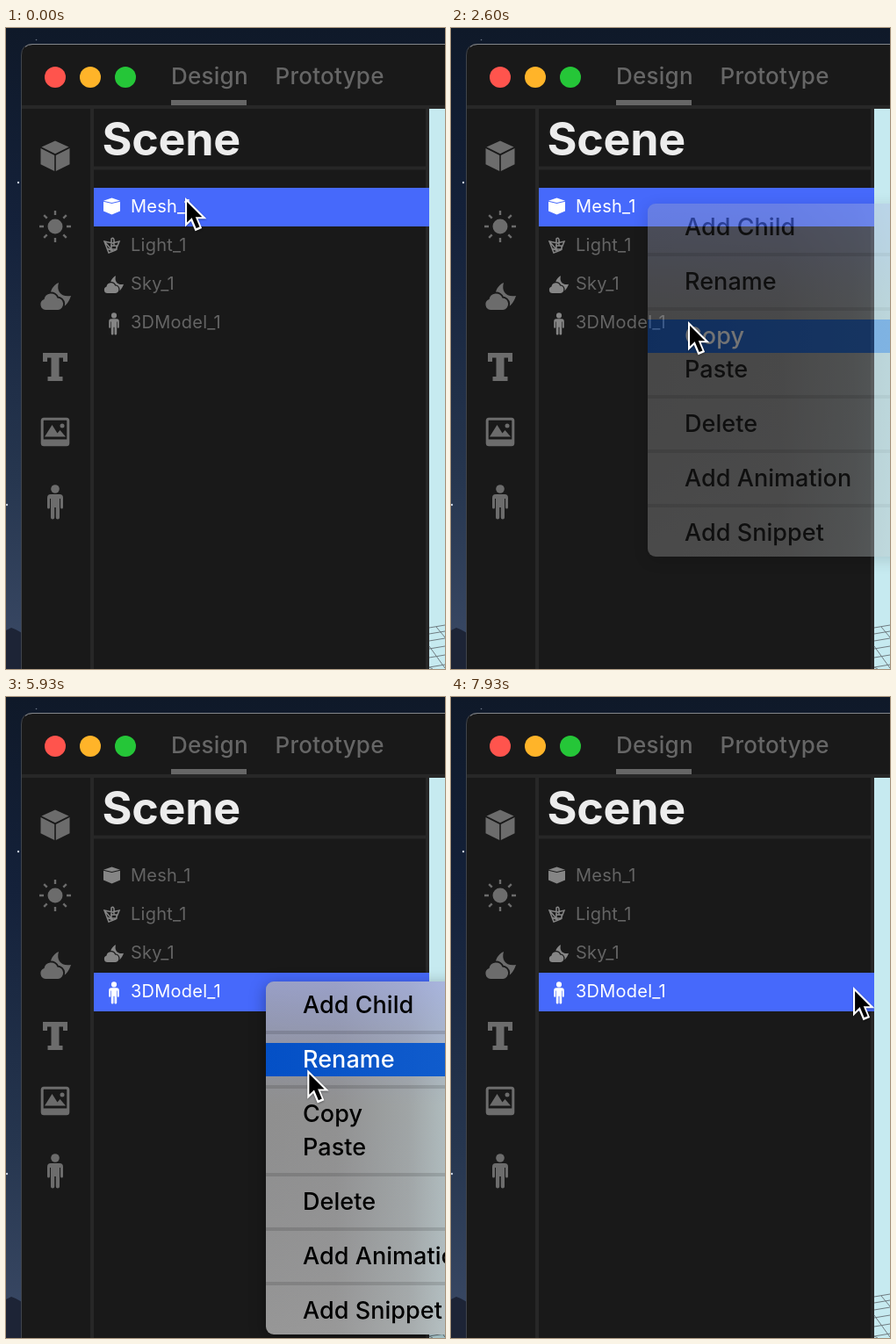
Animation of 500x730 px, one loop 8 s. Source, as an HTML page:

```html
<!DOCTYPE html>
<html lang="en">
<head>
<meta charset="utf-8">
<title>Scene panel</title>
<style>
  html, body { margin: 0; width: 100%; height: 100%; overflow: hidden; background: #191919; }
  svg { display: block; width: 100vw; height: 100vh; }
  text { font-family: Inter, "Open Sans", sans-serif; }
  .tab { font-size: 26px; font-weight: 500; fill: #666; letter-spacing: .25px; }
  .title { font-size: 52px; font-weight: 700; fill: #ececec; letter-spacing: -.3px; }
  .row text { font-size: 20px; letter-spacing: .25px; fill: currentColor; }
  .item { font-size: 27px; font-weight: 450; letter-spacing: .05px; }
  .shadow { filter: drop-shadow(0 4px 9px rgba(0, 0, 0, .35)); }
  .cursor { filter: drop-shadow(0 1px 1px rgba(0, 0, 0, .35)); }
</style>
</head>
<body>
<svg viewBox="0 0 500 730" preserveAspectRatio="none">
  <defs>
    <linearGradient id="night" x2="0" y2="1">
      <stop offset="0" stop-color="#0f1929"/>
      <stop offset=".3" stop-color="#14213a"/>
      <stop offset=".7" stop-color="#26364f"/>
      <stop offset="1" stop-color="#3b4a66"/>
    </linearGradient>
    <linearGradient id="glass" gradientUnits="userSpaceOnUse" x1="224" y1="0" x2="500" y2="0">
      <stop offset="0" stop-color="#8d8d8d"/>
      <stop offset=".55" stop-color="#919191"/>
      <stop offset=".85" stop-color="#a0a5a6"/>
      <stop offset="1" stop-color="#afbbbd"/>
    </linearGradient>
    <linearGradient id="tint" x2="0" y2="1">
      <stop offset="0" stop-color="#a3b0ff" stop-opacity=".5"/>
      <stop offset=".12" stop-color="#9aa8f0" stop-opacity=".36"/>
      <stop offset=".35" stop-color="#9098c0" stop-opacity="0"/>
      <stop offset="1" stop-color="#fff" stop-opacity=".07"/>
    </linearGradient>
    <linearGradient id="pick" gradientUnits="userSpaceOnUse" x1="0" y1="0" x2="276" y2="0">
      <stop offset="0" stop-color="#0450c6"/>
      <stop offset="1" stop-color="#1460cf"/>
    </linearGradient>

    <!-- icons are centred on 0,0 -->
    <g id="cube" fill="currentColor">
      <path d="M0-17.5 15.5-10.500 0-2.700-15.500-10.500Z"/>
      <path d="M-16.500-9-.8-1V17L-16.500 9.300Z"/>
      <path d="M16.500-9 .8-1V17L16.500 9.300Z"/>
    </g>
    <g id="sun" fill="currentColor" stroke="currentColor">
      <circle r="8.5" stroke="none"/>
      <path d="M0-13V-18M0 13V18M-13 0H-18M13 0H18M-9.3-9.3-12.8-12.8M9.3-9.3 12.8-12.8M-9.3 9.3-12.8 12.8M9.3 9.3 12.8 12.8" stroke-width="2.4"/>
    </g>
    <g id="sky" fill="currentColor">
      <path d="M4-16C1-6 7 1 18-1 15 8 10 13 3 13-8 13-10-10 4-16Z"/>
      <path d="M-11 15A6.200 6.200 0 0 1-12.500 3 7.800 7.800 0 0 1 2.500 1.500 6.800 6.800 0 0 1 3.500 15Z" stroke="#191919" stroke-width="4" paint-order="stroke"/>
    </g>
    <path id="type" fill="currentColor" d="M-14-16H14V-6H9V-10.500H4.500V11H8.500V16H-8.500V11H-4.500V-10.500H-9V-6H-14Z"/>
    <g id="photo" fill="currentColor">
      <rect x="-14.800" y="-14.800" width="29.600" height="29.600" rx="2" fill="none" stroke="currentColor" stroke-width="3"/>
      <path d="M-12 5.500-3.500-8 2.500 1.500 5.500-2 12 5.500Z"/>
      <circle cx="8" cy="-7" r="2.500"/>
      <path d="M-14 8.500H14V14H-14Z"/>
    </g>
    <g id="person" fill="currentColor">
      <circle cy="-15" r="4.800"/>
      <path d="M-5-9H5Q9-9 9-5V6Q9 7.500 7.500 7.500 6 7.500 6 6V-4H5V17.500Q5 19.500 2.900 19.500 .8 19.500 .8 17.500V6H-.8V17.500Q-.8 19.500-2.900 19.500-5 19.500-5 17.500V-4H-6V6Q-6 7.500-7.500 7.500-9 7.500-9 6V-5Q-9-9-5-9Z"/>
    </g>
    <g id="box" fill="currentColor">
      <path d="M0-9.500 9.500-6.300 0-4-9.500-6.300Z"/>
      <path d="M-9.500-5.300 0-3 9.500-5.300V5.500L0 9.500-9.500 5.500Z"/>
    </g>
    <path id="lamp" fill="none" stroke="currentColor" stroke-width="1.500" d="M-9-5 0-3 8-5 4 5-4 8ZM-9-5-2 3M-1 4V-8Q1-10 2-7V0M-2 0H5V4H-3M-6 3 1 6"/>
  </defs>

  <rect width="500" height="730" fill="url(#night)"/>
  <path d="M0 686 6 683 11 685 20 690V730H0Z" fill="#1d2436"/>
  <g fill="#c9d3e4">
    <circle cx="14" cy="176" r="1.200"/>
    <circle cx="1" cy="543" r="1.200"/>
    <circle cx="34.500" cy="13.500" r=".8" opacity=".5"/>
  </g>
  <path d="M17.500 740V31Q17.500 18.500 30 18.500H510V740Z" fill="#191919" stroke="#40444b"/>
  <path d="M22 21.500Q25 18.500 30 18.500H500" fill="none" stroke="#83868b"/>

  <circle cx="56" cy="56" r="12" fill="#ff544d"/>
  <circle cx="96" cy="56" r="12" fill="#ffb429"/>
  <circle cx="136" cy="56" r="12" fill="#25c638"/>
  <text class="tab" x="188" y="64">Design</text>
  <text class="tab" x="306.500" y="64">Prototype</text>
  <path d="M188 82H274V88H188Z" fill="#666"/>
  <path d="M18 90H500M98 90V730M100 159.500H480M480 92V730" stroke="#272727" stroke-width="4"/>
  <text class="title" x="109.500" y="144.500">Scene</text>

  <path d="M482 92H500V730H482Z" fill="#c6eaf0"/>
  <path d="M482 683 500 680M482 690 500 687M482 698 500 695M482 707 500 704M482 717 500 714M482 728 500 725M482 704 500 729M490 682 500 694M482 728 486 730" stroke="#6f7b80" fill="none"/>

  <g id="tools" color="#6c6c6c"></g>
  <g id="rows"></g>
  <g id="menu">
    <rect id="pane" class="shadow" width="330" height="402" rx="9" fill="url(#glass)"/>
    <rect id="wash" width="330" height="402" rx="9" fill="url(#tint)"/>
    <g id="list">
      <path d="M0 58H330M0 120H330M0 220H330M0 282H330M0 344H330" stroke="#000" stroke-width="4" opacity=".12"/>
      <rect id="hover" width="330" height="38" fill="url(#pick)"/>
    </g>
  </g>
  <g id="cursor" class="cursor">
    <g transform="scale(2.1)">
      <path d="M0 16V0L11.600 11.600H4.800L4.400 11.700ZM9.100 16.700 5.500 18.200.8 7.100 4.500 5.600Z" fill="#fff"/>
      <path d="M1 2.400V13.600L4 10.700 4.400 10.600H9.200Z"/>
      <rect x="-1" y="-4" width="2" height="8" transform="translate(5.400 12.600) rotate(-22.800)"/>
    </g>
  </g>
</svg>
<script>
const LOOP = 8000;
const $ = id => document.getElementById(id);

function add(parent, tag, attrs, label) {
  const el = document.createElementNS(parent.namespaceURI, tag);
  for (const k in attrs) el.setAttribute(k, attrs[k]);
  if (label) el.textContent = label;
  parent.appendChild(el);
  return el;
}

['cube', 'sun', 'sky', 'type', 'photo', 'person'].forEach((id, i) => {
  const y = i < 4 ? 146 + 80 * i : 460 + 80 * (i - 4);
  add($('tools'), 'use', { href: '#' + id, x: 56, y });
});

const rows = [
  ['Mesh_1', 'box', 120.5, 203, 1],
  ['Light_1', 'lamp', 121, 248, 1],
  ['Sky_1', 'sky', 122.5, 292.5, .64],
  ['3DModel_1', 'person', 123, 337, .64]
].map(([name, icon, x, y, scale], i) => {
  const g = add($('rows'), 'g', { class: 'row' });
  const bar = add(g, 'rect', { x: 100, y: 182 + 44 * i, width: 382, height: 44, fill: '#4669fb' });
  add(g, 'use', { href: '#' + icon, transform: `translate(${x} ${y}) scale(${scale})` });
  const label = add(g, 'text', { x: 142, y: 210 + 44 * i }, name);
  return { g, bar, label };
});

const items = [
  ['Add Child', 26], ['Rename', 88], ['Copy', 150], ['Paste', 188],
  ['Delete', 250], ['Add Animation', 312], ['Add Snippet', 374]
].map(([name, mid]) => ({
  mid, el: add($('list'), 'text', { class: 'item', x: 42, y: mid + 10 }, name)
}));

// Cursor stops: time, x, y
const stops = [
  [0, 204, 193], [450, 221, 205], [1150, 221, 205], [1800, 270, 334],
  [2800, 270, 334], [3400, 293, 332], [4400, 293, 332], [4800, 293, 328],
  [5400, 293, 328], [6400, 385, 504], [7230, 385, 504], [7930, 458, 330], [8000, 458, 330]
];
const menus = [
  { x: 224, y: 200, open: 800, pick: 2320, fade: 2450 },
  { x: 296, y: 324, open: 4600, pick: 6810, fade: 6940 }
];
const FADE = 250;
const ease = p => p * p * (3 - 2 * p);

function cursorAt(t) {
  const i = stops.findIndex(s => s[0] > t);
  const [t0, x0, y0] = stops[i - 1], [t1, x1, y1] = stops[i];
  const p = ease((t - t0) / (t1 - t0));
  return [x0 + (x1 - x0) * p, y0 + (y1 - y0) * p];
}

function drawMenu(t, cx, cy) {
  const m = menus.find(m => t >= m.open && t < m.fade + FADE);
  $('menu').style.display = m ? '' : 'none';
  if (!m) return;
  $('menu').setAttribute('opacity', Math.min(1, 1 - (t - m.fade) / FADE));
  for (const id of ['pane', 'wash']) {
    $(id).setAttribute('x', m.x);
    $(id).setAttribute('y', m.y);
  }
  $('list').setAttribute('transform', `translate(${m.x} ${m.y})`);
  const blink = t >= m.pick && t < m.pick + 65;
  const hit = cx >= m.x && !blink && items.find(it => Math.abs(cy - m.y - it.mid) < 19);
  $('hover').style.display = hit ? '' : 'none';
  if (hit) $('hover').setAttribute('y', hit.mid - 18);
  items.forEach(it => it.el.setAttribute('fill', it === hit ? '#fff' : '#000'));
}

function draw(t) {
  const [x, y] = cursorAt(t);
  $('cursor').setAttribute('transform', `translate(${x} ${y})`);
  const active = t < 3530 ? 0 : 3;
  rows.forEach(({ g, bar, label }, i) => {
    const on = i === active;
    bar.style.display = on ? '' : 'none';
    g.setAttribute('color', on ? '#fff' : '#858585');
    label.style.fill = on ? '#fff' : '#646464';
  });
  drawMenu(t, x, y);
}

const start = performance.now();
function tick() {
  draw((performance.now() - start) % LOOP);
  requestAnimationFrame(tick);
}
tick();
</script>
</body>
</html>
```
